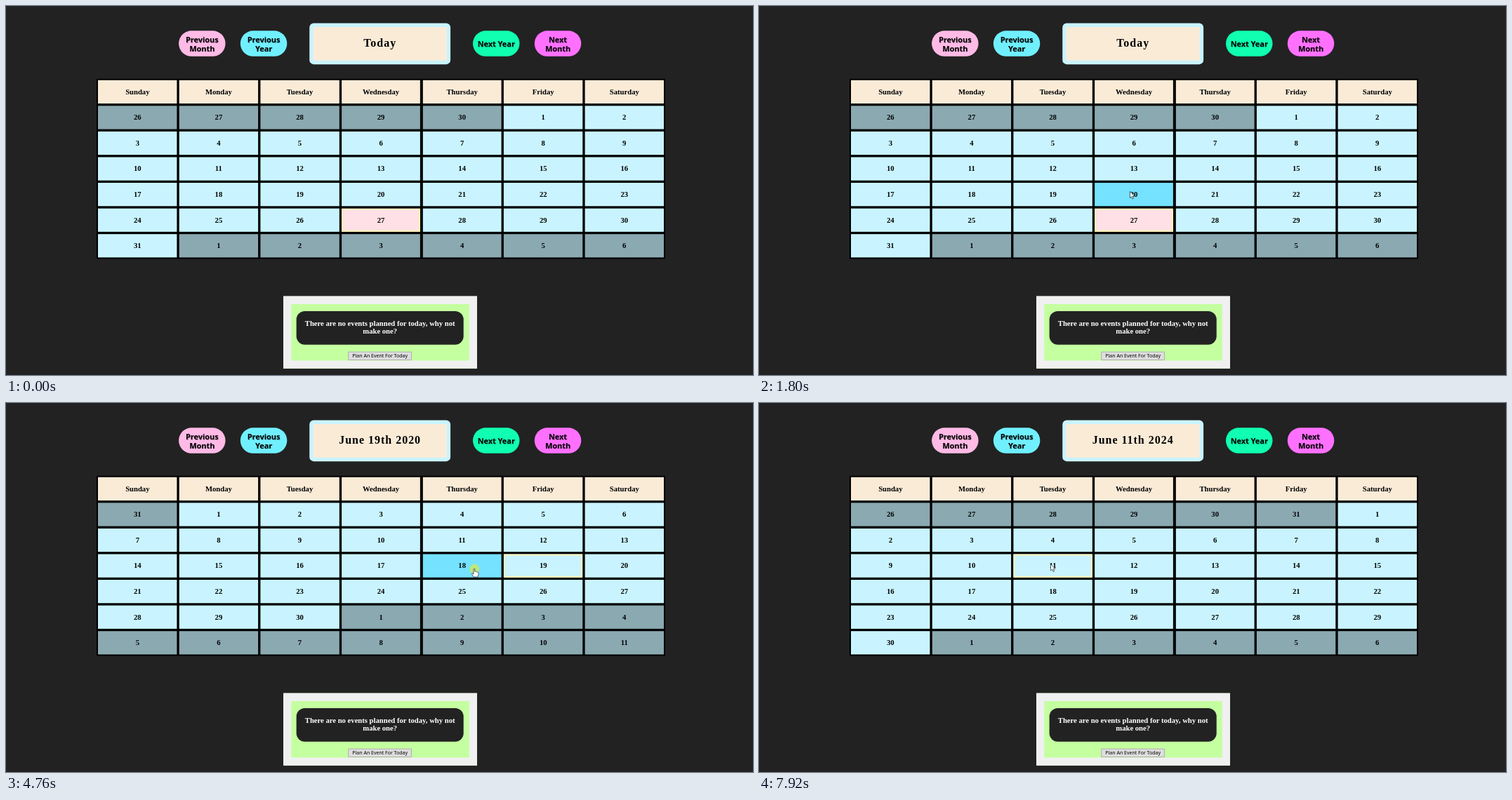
Animation, 1064 px wide and 526 px high, one loop 8000 ms. Source, as an HTML page:

```html
<!DOCTYPE html>
<html lang="en">
<head>
<meta charset="utf-8">
<title>Calendar</title>
<style>
html, body { margin: 0; width: 100%; height: 100%; overflow: hidden; background: #222; }
div, svg { position: absolute; box-sizing: border-box; white-space: nowrap; }
#stage { left: 0; top: 0; width: 1600px; height: 791px; transform: scale(.665); transform-origin: 0 0; font: bold 16px/18px "Liberation Serif", serif; color: #000; text-align: center; cursor: default; }
.title { left: 650px; top: 37px; width: 302px; height: 88px; border: 8.5px solid #c9f4ff; border-radius: 9px; background: #faebd7; font-size: 24px; line-height: 69px; letter-spacing: 1.5px; }
.pill { top: 53px; width: 100px; height: 55px; border-radius: 28px; display: flex; align-items: center; justify-content: center; font: bold 16.4px/19px "Noto Sans", sans-serif; text-shadow: 1px 1px 0 rgba(0,0,0,.3); }
.table { left: 194px; top: 156px; width: 1218px; height: 386px; background: #000; }
.cell { width: 168.8px; height: 50px; line-height: 50px; }
.cell span { display: inline-block; line-height: 19px; }
.head { background: #faebd7; }
.picked { box-shadow: inset 0 0 0 3px #fbf6b4; }
.marked { background: #1f5596; color: #b5d0ee; }
.frame { left: 594px; top: 622px; width: 415px; height: 155px; border: 17px solid #f0f0f0; background: #c4ffa0; }
.note { left: 622px; top: 654px; width: 358px; height: 72px; border-radius: 18px; padding-top: 17px; background: #222; color: #fff; }
.plan { left: 733px; top: 741px; width: 136px; height: 18px; border: 1px solid #999; background: #dedede; font: 10.5px/16px "Noto Sans", sans-serif; }
.dot { left: 0; top: 0; width: 21px; height: 21px; margin: -10.5px; border-radius: 50%; background: rgba(255,238,0,.5); }
svg { left: 0; top: 0; width: 1px; height: 1px; overflow: visible; }
svg path { fill: #fff; stroke: #222; stroke-width: .7; transform: scale(1.5); }
</style>
</head>
<body>
<div id="stage">
  <div class="title"></div>
  <div class="table"></div>
  <div class="frame"></div>
  <div class="note">There are no events planned for today, why not<br>make one?</div>
  <div class="plan">Plan An Event For Today</div>
  <div class="dot"></div>
  <svg id="arrow"><path d="M.3 .3V9.6L2.4 7.7 3.9 11.1 5.4 10.4 4 7.2H6.8Z"/></svg>
  <svg id="hand"><path d="M-.9 .6Q0-.6 .9 .6V4.2Q1.9 3.5 2.6 4.5 3.6 3.9 4.3 5 5.5 4.5 6 5.7V8.6L4.8 12H-.8L-3.6 7.6Q-3.2 6-1.9 7L-.9 7.9Z"/></svg>
</div>
<script>
const LOOP = 8000, STEP = 40;
const DAYS = ['Sunday', 'Monday', 'Tuesday', 'Wednesday', 'Thursday', 'Friday', 'Saturday'];
const MONTHS = ['January', 'February', 'March', 'April', 'May', 'June', 'July',
  'August', 'September', 'October', 'November', 'December'];

const $ = s => document.querySelector(s);
const title = $('.title'), dot = $('.dot'), arrow = $('#arrow'), hand = $('#hand');

function add(cls, x, html) {
  const el = document.createElement('div');
  el.className = cls;
  el.style.left = x + 'px';
  el.innerHTML = html;
  $('#stage').insertBefore(el, dot);
  return el;
}

function addPill(x, color, label) {
  const el = add('pill', x, label);
  el.style.background = color;
  return { el, x, y: 53, w: 100, h: 55 };
}

function addCell(row, col, cls, html) {
  const x = 197.3 + 173.8 * col, y = 159 + 55 * row;
  const el = add(cls, x, html);
  el.style.top = y + 'px';
  return { el, x, y, w: 168.8, h: 50 };
}

addPill(370, '#ffbae6', 'Previous<br>Month');
addPill(502, '#70f0ff', 'Previous<br>Year');
const nextYear = addPill(1000, '#10ffb0', 'Next Year');
const nextMonth = addPill(1132, '#ff70ff', 'Next<br>Month');

DAYS.forEach((d, col) => addCell(0, col, 'cell head', d));
const cells = Array.from({ length: 42 }, (_, i) =>
  addCell(1 + Math.floor(i / 7), i % 7, 'cell', '<span></span>'));
const day = (week, col) => cells[week * 7 + col];

function calendar(y, m, d) {
  const date = new Date(Date.UTC(y, m, d));
  [y, m, d] = [date.getUTCFullYear(), date.getUTCMonth(), date.getUTCDate()];
  const first = new Date(Date.UTC(y, m, 1)).getUTCDay();
  const days = new Date(Date.UTC(y, m + 1, 0)).getUTCDate();
  return { y, m, d, first, days, picked: first + d - 1 };
}

function press(s, box) {
  if (box === nextYear) return calendar(s.y + 1, s.m, s.d);
  if (box === nextMonth) return calendar(s.y, s.m + 1, s.d);
  return calendar(s.y, s.m, cells.indexOf(box) - s.first + 1);
}

// each click: time, box, offset from its centre
const clicks = [];
function click(t, box, dx = 0, dy = 0) {
  const last = clicks.at(-1) || { t: -LOOP, x: 1508, y: 789, state: calendar(2020, 4, 27) };
  const from = Math.max(last.t + 80, t - 640);
  clicks.push({
    t, from, to: Math.max(from + 80, t - 160), last,
    x: box.x + box.w / 2 + dx, y: box.y + box.h / 2 + dy,
    state: press(last.state, box)
  });
}

click(680, day(4, 4));
click(1120, day(4, 3), 16, -1);
click(1960, day(3, 3), -9, -7);
click(2320, day(2, 3));
click(2640, day(1, 3));
click(3560, nextMonth, 6, 1);
click(4200, day(2, 5));
click(4800, day(2, 4), 26, 6);
for (const t of [6680, 6960, 7300, 7680]) click(t, nextYear, -21, -5);
click(7860, day(2, 2), -5, -4);

const stateAt = t => (clicks.findLast(c => c.t <= t) || clicks[0].last).state;

function pointerAt(t) {
  const c = clicks.findLast(c => c.from <= t) || clicks[0];
  const u = Math.min(1, Math.max(0, (t - c.from) / (c.to - c.from)));
  const e = u * u * (3 - 2 * u);
  return { x: c.last.x + (c.x - c.last.x) * e, y: c.last.y + (c.y - c.last.y) * e };
}

const inside = (p, b) => p.x >= b.x && p.x < b.x + b.w && p.y >= b.y && p.y < b.y + b.h;

function render(t) {
  const s = stateAt(t), p = pointerAt(t);
  const isMay = s.y === 2020 && s.m === 4;
  title.textContent = isMay && s.d === 27 ? 'Today' : `${MONTHS[s.m]} ${s.d}th ${s.y}`;

  // hover fades over the last few samples
  const past = [0, 20, 40, 60].map(d => ({ p: pointerAt(t - d), s: stateAt(t - d) }));
  const hover = (b, i) => past.filter(q => inside(q.p, b) && q.s.picked !== i).length / past.length;

  for (const b of [nextYear, nextMonth]) b.el.style.opacity = 1 - .15 * hover(b);
  cells.forEach((b, i) => {
    const n = i - s.first + 1, inMonth = n >= 1 && n <= s.days;
    const base = !inMonth ? '#8ba9b1' : isMay && n === 27 ? '#ffe0e6' : '#c9f4ff';
    const h = inMonth ? hover(b, i) * 100 : 0;
    const text = b.el.firstChild;
    text.textContent = new Date(Date.UTC(s.y, s.m, n)).getUTCDate();
    text.className = b === day(4, 4) && s.y === 2020 && t >= 5240 ? 'marked' : '';
    b.el.style.background = `color-mix(in srgb, #75e2ff ${h}%, ${base})`;
    b.el.classList.toggle('picked', i === s.picked);
  });

  const pressed = clicks.some(c => t >= c.t - 60 && t < c.t);
  const pointing = pressed || inside(p, nextYear) || inside(p, nextMonth);
  const show = (el, on) => {
    el.style.transform = `translate(${p.x}px, ${p.y}px)`;
    el.style.visibility = on && t >= 80 ? 'visible' : 'hidden';
  };
  show(dot, pressed);
  show(hand, pointing);
  show(arrow, !pointing);
}

function tick() {
  render(Math.floor(performance.now() % LOOP / STEP) * STEP);
  requestAnimationFrame(tick);
}
tick();
</script>
</body>
</html>
```
